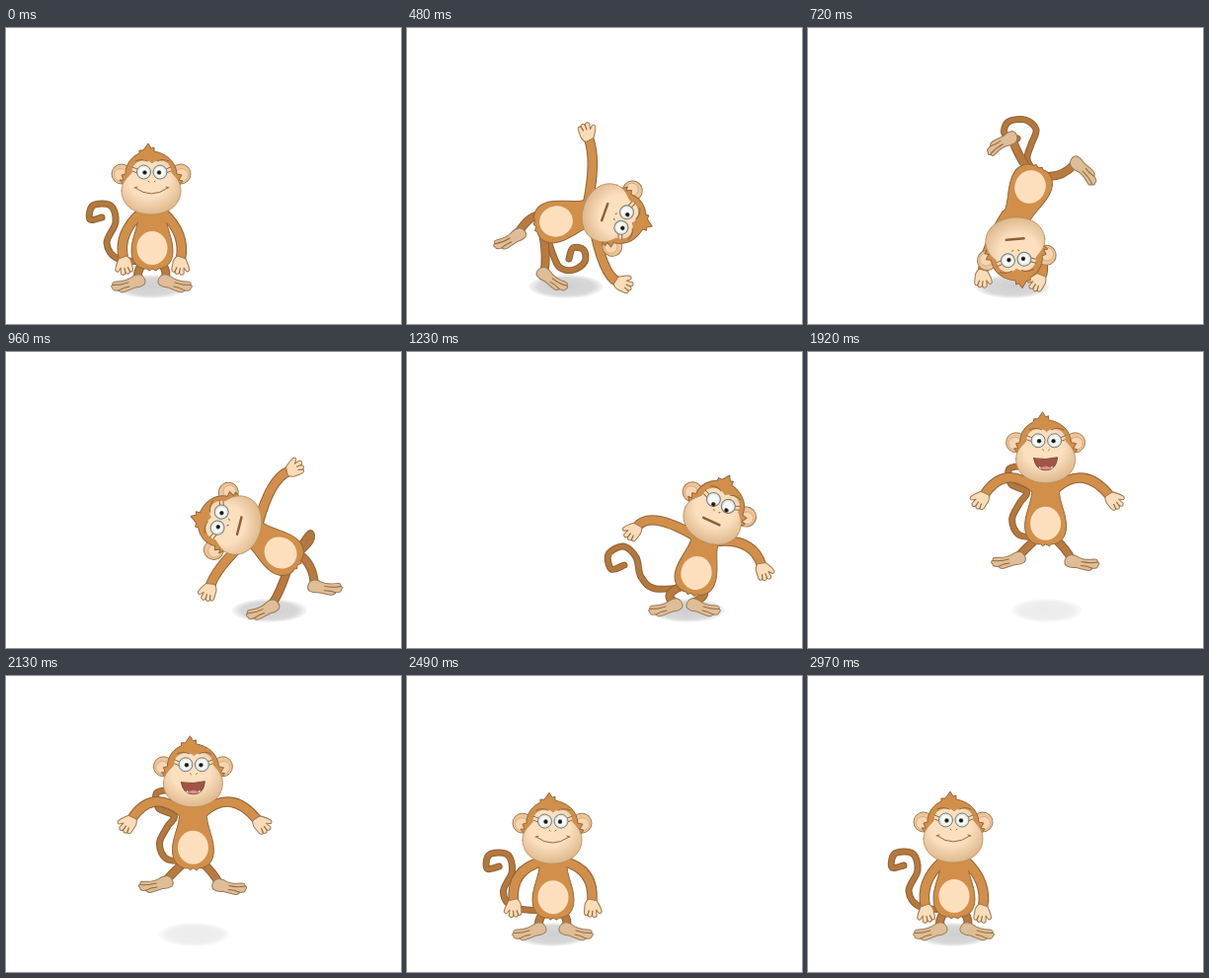
Write an HTML page that moves like this. It is 400 px wide and 300 px high and loops after 3.63 s.

```html
<!DOCTYPE html>
<html lang="en">
<head>
<meta charset="utf-8">
<title>Monkey cartwheel</title>
<style>
html, body { margin: 0; width: 100%; height: 100%; overflow: hidden; background: #fff; }
svg { display: block; width: 400px; height: 300px; }
path { stroke-linecap: round; stroke-linejoin: round; }
.line { fill: none; stroke: #94683c; stroke-width: 1; }
.skin { fill: #fadcb9; stroke: #a07c52; stroke-width: .9; }
.foot { fill: #dfbd96; stroke: #957a58; stroke-width: 1; }
.fur { fill: #d18f4a; stroke: #94683c; stroke-width: 1; }
</style>
</head>
<body>
<svg viewBox="0 0 400 300">
  <defs>
    <radialGradient id="shade">
      <stop offset="0" stop-color="#cfcfcf"/>
      <stop offset=".75" stop-color="#d8d8d8"/>
      <stop offset="1" stop-color="#f8f8f8"/>
    </radialGradient>
    <radialGradient id="face" cx=".46" cy=".36" r=".66">
      <stop offset=".5" stop-color="#fbdfbf"/>
      <stop offset="1" stop-color="#dcb68a"/>
    </radialGradient>
    <radialGradient id="eye">
      <stop offset=".5" stop-color="#fff"/>
      <stop offset="1" stop-color="#c4e2ee"/>
    </radialGradient>
    <g id="hand" transform="scale(1.18)">
      <path class="skin" d="M-4,-1 C-6,2 -8,4 -9,8 Q-8,11 -6,9 L-4,7 L-5,12 Q-3,15 -1,12 Q1,15 3,12 Q6,13 6,9 L6,3 Q5,-1 3,-2 Z"/>
      <path class="line" d="M-1,12 L-1,8 M3,12 L2,8"/>
    </g>
    <g id="foot">
      <path class="foot" d="M4,-3 Q9,2 6,6 Q2,9 -3,9 L-13,13 Q-18,15 -20,12 Q-26,13 -26,10 Q-29,8 -26,6 Q-27,3 -22,3 Q-12,3 -6,-2 Q0,-6 4,-3 Z"/>
      <path class="line" d="M-26,6.5 Q-18,7 -10,4 M-20,12 Q-15,9 -9,8"/>
    </g>
    <g id="ear">
      <circle r="10" fill="#edc59b" stroke="#a07c52"/>
      <circle cx="-1" cy="1" r="6.5" fill="#f7d5b0" stroke="#d2a77b" stroke-width=".8"/>
    </g>
    <circle id="eyeball" r="7" fill="url(#eye)" stroke="#857a68"/>
    <g id="pupil">
      <circle r="2.3" fill="#5f4a2c"/>
      <circle r="1.4" fill="#111"/>
    </g>
  </defs>
  <ellipse id="shadow" cy="262" fill="url(#shade)"/>
  <g id="monkey">
    <g id="back"></g>
    <g id="body">
      <path class="fur" d="M-15,-43 C-10,-26 -21,-14 -21,3 C-21,16 -12,22 -5,21 L-3,23 L0,21 L4,23 L6,21 C13,21 21,16 21,3 C21,-14 10,-26 15,-43 Z"/>
      <ellipse rx="15.5" ry="17" fill="#fddfbe"/>
    </g>
    <g id="front"></g>
    <g id="head">
      <use href="#ear" x="-30" y="-15"/>
      <use href="#ear" transform="translate(30 -15) scale(-1 1)"/>
      <path class="fur" d="M-28,-4 L-32,-9 L-28,-9 L-30,-14 L-26,-15 C-26,-26 -19,-33 -12,-36 L-12,-39 L-8,-39 L-3,-46 L0,-41 L3,-42 L3,-38 C14,-36 25,-29 26,-15 L31,-14 L28,-9 L32,-8 L28,-3 Z"/>
      <path d="M-30,2 C-30,-8 -23,-12 -20,-16 C-20,-30 -4,-32 1,-26 C6,-32 21,-30 21,-16 C25,-12 30,-7 30,2 C30,17 16,26 0,26 C-16,26 -30,17 -30,2 Z" fill="url(#face)" stroke="#b98b58" stroke-width=".8"/>
      <path class="line" d="M-16,-28 Q-10,-31 -4,-28 M6,-28 Q12,-31 18,-28 M-14,-20 L-19,-22 M-14,-16 L-19,-18 M15,-20 L20,-22 M15,-16 L20,-18"/>
      <use href="#eyeball" x="-7.5" y="-17"/>
      <use href="#eyeball" x="9" y="-17"/>
      <g id="pupils">
        <use href="#pupil" x="-6.5" y="-16.5"/>
        <use href="#pupil" x="8" y="-16.5"/>
      </g>
      <path class="line" d="M-3,-8 L-2,-7 M4,-8 L3,-7"/>
      <path id="smile" class="line" d="M-17,-1 L-14,-2 M-16,-1 Q0,11 17,-1 M15,-2 L18,-1"/>
      <path id="flat" d="M-9,4 H9" stroke="#8c5f36" stroke-width="2.4"/>
      <g id="open">
        <path d="M-12,1 Q0,3 12,0 Q11,13 0,13 Q-10,13 -12,1 Z" fill="#a2544a" stroke="#7c4d36"/>
        <path d="M-5,11 Q0,7 6,11 Q0,14 -5,11 Z" fill="#dc9088"/>
        <path d="M-6,9 L-4,12 L-7,11 Z M6,9 L5,12 L8,10 Z" fill="#f3e3da"/>
      </g>
    </g>
  </g>
</svg>
<script>
const LOOP = 3630, STEP = 30, END = 2970, ACROSS = 134;
const $ = id => document.getElementById(id);
const NS = 'http://www.w3.org/2000/svg';

// Stage coordinates. body, head: x, y, angle. Arms: elbow, wrist.
// Legs: knee, ankle, foot angle. Tail: points from root to tip.
const rest = {
  shadow: 147, body: [148, 223, 0], head: [147, 163, 0], gaze: [0, 0],
  armL: [113, 208, 119, 234], armR: [182, 208, 177, 234],
  legL: [132, 248, 134, 254, 0], legR: [164, 248, 161, 254, 0],
  tail: [114, 234, 102, 218, 111, 197, 106, 180, 88, 180, 85, 194, 97, 192]
};
const air = {
  shadow: 190, body: [189, 174, 0], head: [189, 107, 0], gaze: [0, 0],
  armL: [147, 114, 127, 145], armR: [228, 114, 254, 146],
  legL: [170, 198, 162, 207, 4], legR: [210, 200, 215, 210, -7],
  tail: [163, 186, 155, 170, 163, 153, 170, 142, 154, 134, 152, 119, 164, 116]
};

const POINTS = { body: 2, head: 2, gaze: 0, armL: 4, armR: 4, legL: 4, legR: 4, tail: 14 };

function shift(pose, dx, dy = 0) {
  const out = { shadow: pose.shadow + dx };
  for (const part in POINTS)
    out[part] = pose[part].map((v, i) => i < POINTS[part] ? v + (i % 2 ? dy : dx) : v);
  return out;
}
function turned(pose, turn) {
  const out = { ...pose };
  for (const part of ['body', 'head', 'legL', 'legR'])
    out[part] = [...pose[part].slice(0, -1), pose[part].at(-1) + turn];
  return out;
}

const home = turned(shift(rest, ACROSS), 360);
const ready = {
  ...home, shadow: 282, body: [281, 223, 360], head: [280, 164, 360],
  armL: [226, 170, 213, 194], armR: [330, 168, 341, 203],
  legL: [257, 246, 272, 254, 360], legR: [306, 246, 290, 254, 360],
  tail: [246, 240, 234, 228, 233, 207, 226, 192, 210, 189, 203, 202, 214, 206]
};
const leap = turned(shift(air, 93, 57), 360);
const tailOut = shift(home, -13, 3).tail;

const keys = [
  [0, rest],
  [180, {
    ...rest, body: [144, 223, -6], head: [140, 164, -8],
    armL: [108, 172, 90, 204], armR: [184, 174, 200, 203],
    tail: shift(rest, -13).tail
  }],
  [330, {
    ...rest, shadow: 152, body: [152, 210, 32], head: [183, 161, 42],
    armL: [150, 140, 146, 118], armR: [205, 195, 213, 220],
    legL: [134, 238, 122, 248, 0], legR: [160, 240, 150, 252, 8],
    tail: [125, 225, 115, 210, 118, 192, 108, 182, 95, 188, 96, 202, 107, 200]
  }],
  [480, {
    shadow: 161, body: [151, 196, 76], head: [204, 188, 110], gaze: [1, -2],
    armL: [192, 134, 184, 112], armR: [198, 250, 213, 257],
    legL: [124, 190, 113, 207, -12], legR: [142, 232, 139, 247, 18],
    tail: [150, 235, 157, 244, 169, 245, 180, 237, 179, 225, 168, 223, 164, 234]
  }],
  [720, {
    shadow: 207, body: [225, 161, 204], head: [210, 218, 175], gaze: [0, 0],
    armL: [244, 238, 236, 252], armR: [180, 222, 177, 247],
    legL: [257, 152, 270, 138, 243], legR: [213, 130, 207, 113, 132],
    tail: [222, 133, 226, 118, 231, 103, 220, 93, 203, 95, 199, 107, 212, 112]
  }],
  [900, {
    shadow: 255, body: [272, 192, 282], head: [220, 188, 255], gaze: [0, 0],
    armL: [222, 240, 214, 253], armR: [232, 130, 240, 112],
    legL: [290, 230, 283, 250, 345], legR: [308, 190, 320, 208, 340],
    tail: [290, 185, 300, 165, 312, 150, 322, 160, 316, 172, 306, 168, 308, 160]
  }],
  [1080, {
    ...ready, body: [286, 221, 348], head: [275, 163, 340],
    armL: [235, 175, 220, 205], armR: [330, 155, 347, 172],
    tail: [262, 238, 250, 225, 255, 207, 248, 190, 232, 190, 226, 203, 238, 206]
  }],
  [1230, {
    ...ready, shadow: 284, body: [293, 224, 375], head: [310, 168, 385], gaze: [1, 4],
    armL: [246, 160, 233, 177], armR: [350, 188, 359, 216],
    tail: [252, 240, 237, 228, 232, 208, 219, 197, 204, 205, 207, 220, 220, 216]
  }],
  [1440, { ...ready, body: [279, 223, 357], head: [277, 165, 354], armR: [330, 160, 349, 192] }],
  [1680, ready],
  [1750, ready],
  [1920, leap],
  [2130, leap],
  [2300, { ...home, armL: [238, 165, 222, 200], armR: [326, 165, 341, 200], tail: ready.tail }],
  [2400, {
    ...home, body: [282, 230, 360], head: [281, 173, 360],
    armL: [238, 186, 234, 222], armR: [325, 186, 328, 222], tail: tailOut
  }],
  [2550, { ...home, body: [282, 221, 360], head: [281, 159, 360], armL: [240, 200, 246, 230], armR: [323, 200, 318, 230] }],
  [2700, { ...home, head: [281, 160, 360] }],
  [END, home]
];

const rotate = (x, y, deg) => {
  const a = deg * Math.PI / 180, c = Math.cos(a), s = Math.sin(a);
  return [x * c - y * s, x * s + y * c];
};
const blended = Object.keys(POINTS).filter(part => part !== 'body');

// Limbs are blended in the frame of the turning body.
function flatten(pose) {
  const [bx, by, turn] = pose.body, out = [pose.shadow, bx, by, turn];
  for (const part of blended) {
    const v = pose[part], n = POINTS[part];
    for (let i = 0; i < n; i += 2) out.push(...rotate(v[i] - bx, v[i + 1] - by, -turn));
    out.push(...v.slice(n));
  }
  return out;
}
function unflatten(flat) {
  let i = 4;
  const [shadow, bx, by, turn] = flat, pose = { shadow, body: [bx, by, turn] };
  for (const part of blended) {
    const v = pose[part] = [];
    while (v.length < POINTS[part]) {
      const [x, y] = rotate(flat[i++], flat[i++], turn);
      v.push(bx + x, by + y);
    }
    while (v.length < rest[part].length) v.push(flat[i++]);
  }
  return pose;
}

const times = keys.map(k => k[0]), values = keys.map(k => flatten(k[1]));

// Monotone cubic blending: smooth, without overshoot.
function poseAt(t) {
  let k = 0;
  while (k < times.length - 2 && t >= times[k + 1]) k++;
  const span = times[k + 1] - times[k], u = (t - times[k]) / span;
  const slope = (j, i) => (values[j + 1][i] - values[j][i]) / (times[j + 1] - times[j]);
  const tangent = (j, i) => {
    if (j === 0 || j === times.length - 1) return 0;
    const a = slope(j - 1, i), b = slope(j, i);
    return a * b > 0 ? 2 * a * b / (a + b) : 0;
  };
  return unflatten(values[k].map((a, i) => {
    const d = values[k + 1][i] - a, m = tangent(k, i) * span, n = tangent(k + 1, i) * span;
    return a + u * (m + u * (3 * d - 2 * m - n + u * (m + n - 2 * d)));
  }));
}

function add(parent, tag, attrs) {
  const el = document.createElementNS(NS, tag);
  for (const name in attrs) el.setAttribute(name, attrs[name]);
  return parent.appendChild(el);
}
function tube(edgeLayer, fillLayer, color, width) {
  const stroke = (layer, ink, w) => add(layer, 'path', { fill: 'none', stroke: ink, 'stroke-width': w });
  const paths = [stroke(edgeLayer, '#8e6236', width), stroke(fillLayer, color, width - 2)];
  return d => paths.forEach(p => p.setAttribute('d', d));
}

// Arm edges lie behind the body and arm fills in front, so shoulders merge.
const back = $('back'), front = $('front');
const drawTail = tube(back, back, '#b5783c', 7);
const sides = [['L', -1], ['R', 1]].map(([name, sign]) => ({
  name, sign,
  leg: tube(back, back, '#b87a3e', 9),
  foot: add(back, 'use', { href: '#foot' }),
  arm: tube(back, front, '#d18f4a', 10.5),
  hand: add(front, 'use', { href: '#hand' })
}));

function curve(p) {
  const at = (i, c) => p[Math.max(0, Math.min(p.length / 2 - 1, i)) * 2 + c];
  let d = `M${p[0]},${p[1]}`;
  for (let i = 0; i < p.length / 2 - 1; i++) {
    const c = [0, 1].map(k => at(i, k) + (at(i + 1, k) - at(i - 1, k)) / 6);
    const e = [0, 1].map(k => at(i + 1, k) - (at(i + 2, k) - at(i, k)) / 6);
    d += `C${c} ${e} ${at(i + 1, 0)},${at(i + 1, 1)}`;
  }
  return d;
}

const place = (el, x, y, a, sx = 1) =>
  el.setAttribute('transform', `translate(${x} ${y}) rotate(${a}) scale(${sx} 1)`);

function draw(t) {
  const pose = poseAt(t), [bx, by, turn] = pose.body;
  const onBody = (x, y) => {
    const [dx, dy] = rotate(x, y, turn);
    return [bx + dx, by + dy];
  };
  const p = Math.max(0, Math.min(1, (t - 1750) / 550));
  const lift = 4 * p * (1 - p);
  $('monkey').setAttribute('transform', `translate(${-ACROSS * p} ${-67 * lift})`);

  const shadow = $('shadow');
  shadow.setAttribute('cx', pose.shadow - ACROSS * p);
  shadow.setAttribute('rx', 38 - 2 * lift);
  shadow.setAttribute('ry', 12);
  shadow.setAttribute('opacity', 1 - 0.68 * lift);

  place($('body'), bx, by, turn);
  place($('head'), ...pose.head);
  place($('pupils'), ...pose.gaze, 0);
  drawTail(curve([...onBody(0, 14), ...pose.tail]));

  for (const s of sides) {
    const [kx, ky, ax, ay, fa] = pose['leg' + s.name];
    s.leg(`M${onBody(s.sign * 10, 16)} Q${kx},${ky} ${ax},${ay}`);
    place(s.foot, ax, ay, fa, -s.sign);
    const [ex, ey, wx, wy] = pose['arm' + s.name];
    s.arm(`M${onBody(s.sign * 11, -36)} Q${ex},${ey} ${wx},${wy}`);
    place(s.hand, wx, wy, Math.atan2(wy - ey, wx - ex) * 180 / Math.PI - 90, -s.sign);
  }

  const mouth = t < 120 || t >= 2430 ? 'smile' : t < 1750 ? 'flat' : 'open';
  for (const id of ['smile', 'flat', 'open'])
    $(id).style.display = id === mouth ? '' : 'none';
}

const start = performance.now();
function tick() {
  const t = (performance.now() - start) % LOOP;
  draw(Math.min(END, Math.floor(t / STEP) * STEP));
  requestAnimationFrame(tick);
}
tick();
</script>
</body>
</html>
```
